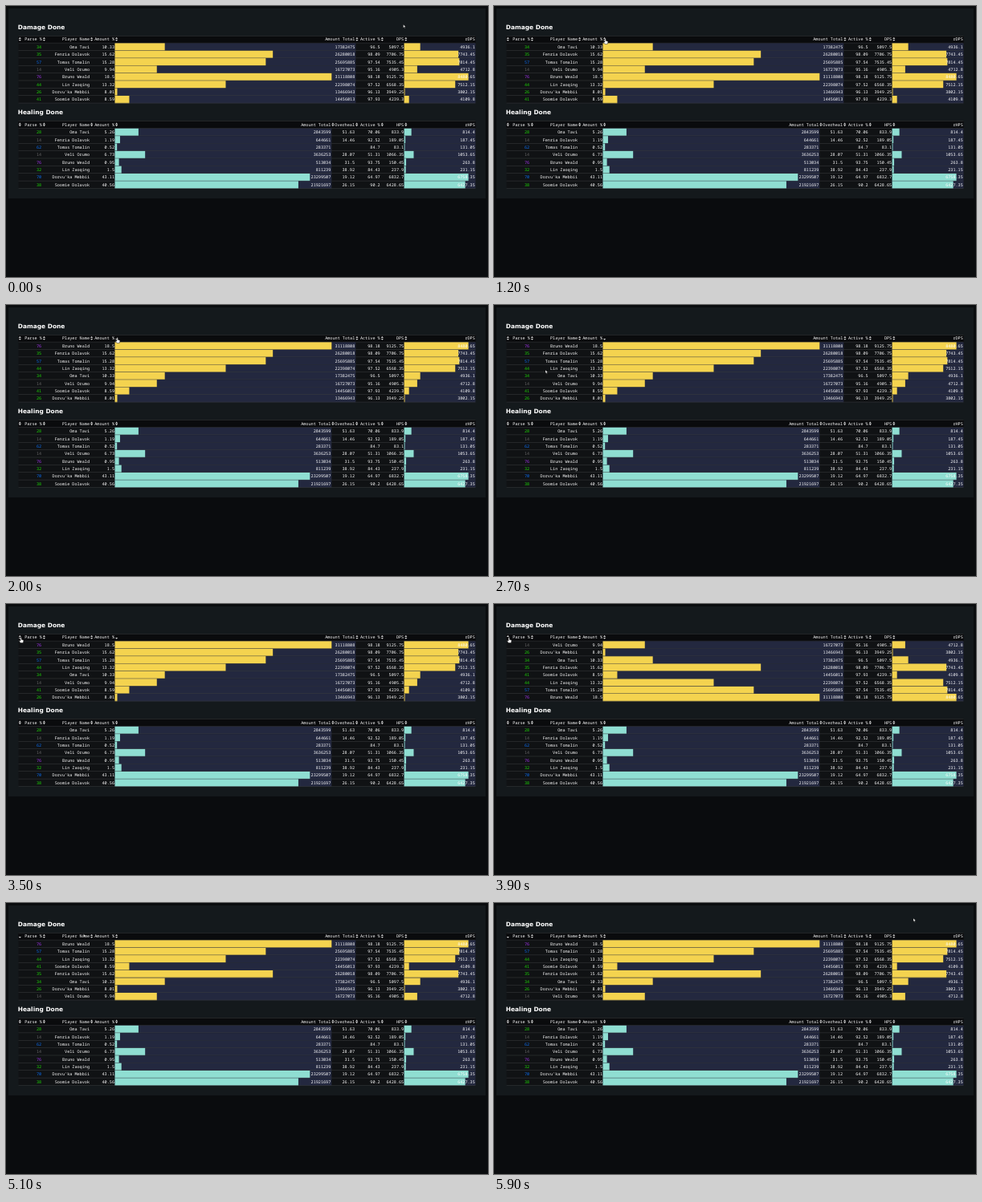
These frames come from a looping animation (600 px wide and 338 px high, 7 s). An HTML page:

```html
<!DOCTYPE html>
<html lang="en">
<head>
<meta charset="utf-8">
<title>Sortable tables</title>
<style>
html, body { margin: 0; width: 100%; height: 100%; overflow: hidden; background: #0a0c0e; }
svg { display: block; }
text { font: 5.17px "Noto Sans Mono", "DejaVu Sans Mono", monospace; fill: #fff; text-anchor: end; text-rendering: geometricPrecision; }
.title { font: bold 7.45px "DejaVu Sans", sans-serif; text-anchor: start; }
</style>
</head>
<body>
<svg id="stage" width="600" height="338" viewBox="0 0 600 338"></svg>
<script>
const LEFT = 15.5, RIGHT = 584.5, BAR = 135.5, RATE_BAR = 495.6, ROW = 9.37, LOOP = 7000, FIGHT = 3410;

// Name, then parse, rate and adjusted rate for damage and for healing
const players = [
  ["Oma Tavi", 34, 5097.5, 4936.1, 28, 833.9, 814.4],
  ["Fenria Dolavok", 35, 7706.75, 7743.45, 14, 189.05, 187.45],
  ["Tomas Tomalin", 57, 7535.45, 7814.45, 62, 83.1, 131.05],
  ["Veli Orumo", 14, 4905.3, 4712.8, 14, 1066.35, 1053.65],
  ["Bruno Weald", 76, 9125.75, 8480.65, 76, 150.45, 263.8],
  ["Lin Zaoqing", 44, 6568.35, 7512.15, 32, 237.9, 231.15],
  ["Dorvu'ka Mebbii", 26, 3949.25, 3802.15, 70, 6832.7, 6758.35],
  ["Soomie Dolavok", 41, 4239.3, 4109.8, 38, 6428.65, 6427.35]
];

const round2 = v => +v.toFixed(2);
const noise = n => { const v = Math.sin(n * 12.9898) * 43758.5453; return v - Math.floor(v); };
const between = (lo, hi, n) => round2(lo + (hi - lo) * noise(n));

function makeTable(title, unit, top, color, first, group, active) {
  const heals = unit === "HPS";
  const columns = [["Parse %", 44.8], ["Player Name", 104], ["Amount %", 135],
    ["Amount Total", heals ? 404.3 : 434.3], ...heals ? [["Overheal", 434]] : [],
    ["Active %", 465.7], [unit, 495.2], ["r" + unit, 583.8]];
  const rows = players.map((p, i) => {
    const [parse, rate, adjusted] = p.slice(first);
    const total = Math.round(rate * FIGHT);
    const overheal = rate > 100 ? between(12, 55, i + 1) : "";
    return { parse, rate, adjusted, cells: [parse, p[0], round2(rate / group), total,
      ...heals ? [overheal] : [], between(...active, i + 9), rate, adjusted] };
  });
  return { title, top, color, columns, rows, split: columns[3][1] + 1 };
}
const damage = makeTable("Damage Done", "DPS", 37, "#f4d34f", 1, 493.3, [94.5, 98.2]);
const healing = makeTable("Healing Done", "HPS", 143.4, "#8fded2", 4, 158.5, [42, 94]);

const rect = (x, y, w, h, fill) => `<rect x="${x}" y="${y}" width="${w}" height="${h}" fill="${fill}"/>`;
const label = (x, y, s, fill = "#fff") => `<text x="${x}" y="${y}" style="fill:${fill}">${s}</text>`;
const line = y => rect(LEFT, y, RIGHT - LEFT, 0.5, "#3a3c3f");
const parseColor = p => p < 25 ? "#6a6a6a" : p < 50 ? "#1ddb05" : p < 75 ? "#0a6cf0" : "#a335ee";

// A bar fills 1% of its cell for the lowest value and 90% for the highest.
function bar(table, row, key, x, right) {
  const all = table.rows.map(r => r[key]), min = Math.min(...all), max = Math.max(...all);
  const part = 0.01 + 0.89 * (row[key] - min) / (max - min);
  return rect(x, 0, right - x, ROW, "#23283f") + rect(x, 0, (right - x) * part, ROW, table.color);
}

function rowMarkup(table, row) {
  const texts = row.cells.map((s, c) =>
    label(table.columns[c][1] - (c ? 0 : 0.6), 6.5, s, c ? "#fff" : parseColor(s)));
  return `<g class="row">${bar(table, row, "rate", BAR, table.split)}
    ${bar(table, row, "adjusted", RATE_BAR, RIGHT)}${texts.join("")}${line(ROW - 0.5)}</g>`;
}

function headMarkup([name, edge], i, columns) {
  const iconX = (i ? columns[i - 1][1] : 14.7) + 2.6;
  return label(edge, 6.3, name) + `<g class="icon" transform="translate(${iconX} 4.4)" fill="#d8d8d8">
    <path d="M-1.6-.4L0-2.3 1.6-.4z"/><path d="M-1.6.5L0 2.4 1.6.5z"/></g>`;
}

const tableMarkup = t => `<g class="table" transform="translate(0 ${t.top})">
  <text class="title" x="14.8" y="-8.5">${t.title}</text>
  ${rect(LEFT, 0, RIGHT - LEFT, ROW * 9, "#101214")}${rect(LEFT, 0, RIGHT - LEFT, ROW, "#0a0b0d")}
  ${line(0)}${line(ROW - 0.5)}${t.columns.map(headMarkup).join("")}
  ${t.rows.map(r => rowMarkup(t, r)).join("")}</g>`;

const stage = document.getElementById("stage");
stage.innerHTML = rect(3, 3, 594, 237, "#14191c") + tableMarkup(damage) + tableMarkup(healing) +
  `<g id="cursor" stroke="#111" stroke-width=".4" fill="#fff">
    <path id="arrow" d="M0 0V4.2L1 3.3 1.7 4.8 2.4 4.5 1.7 3.1H3z"/>
    <path id="hand" transform="scale(1.15)" d="M-.6 0Q0-.7.6 0V2L2.5 2.5Q3 2.7 2.8 3.6L2.3 5.6H-.6L-2 3.5-1.5 3-.6 3.6z"/></g>`;

const [damageBox, healingBox] = stage.querySelectorAll(".table");
const damageRows = damageBox.querySelectorAll(".row");
const icons = damageBox.querySelectorAll(".icon");
const cursor = document.getElementById("cursor");
const [arrow, hand] = cursor.children;

const place = (rows, order) => order.forEach((r, i) =>
  rows[r].setAttribute("transform", `translate(0 ${ROW * (i + 1)})`));
const identity = players.map((_, i) => i);
place(healingBox.querySelectorAll(".row"), identity);

// Start time, sort key, direction, header icon
const sorts = [[0, "", 0, -1], [1500, "rate", 1, 3], [2000, "rate", -1, 3],
  [3800, "parse", 1, 0], [4200, "parse", -1, 0]];
// Time, x, y
const path = [[0, 494.5, 23], [800, 102, 59], [1200, 138.6, 41], [2000, 138.6, 41],
  [2300, 112, 115], [2700, 64, 81], [3500, 18.6, 42], [4900, 18.6, 42],
  [5700, 517.5, 20], [5900, 522, 19], [LOOP, 522, 19]];

function cursorAt(t) {
  const i = path.findIndex(p => p[0] > t);
  const [t0, x0, y0] = path[i - 1], [t1, x1, y1] = path[i];
  const u = (t - t0) / (t1 - t0), k = u * u * (3 - 2 * u);
  return [x0 + (x1 - x0) * k, y0 + (y1 - y0) * k];
}

function draw(now) {
  const t = Math.floor(now % LOOP / 100) * 100;
  const [, key, dir, active] = sorts.findLast(s => s[0] <= t);
  const value = i => key ? damage.rows[i][key] : i;
  place(damageRows, [...identity].sort((a, b) => dir * (value(a) - value(b))));
  icons.forEach((icon, i) => {
    const [up, down] = icon.children;
    up.style.opacity = i === active && dir < 0 ? 0 : 1;
    down.style.opacity = i === active && dir > 0 ? 0 : 1;
  });
  const pointing = t >= 1200 && t <= 2000 || t >= 3500 && t <= 4900;
  hand.style.display = pointing ? "" : "none";
  arrow.style.display = pointing ? "none" : "";
  cursor.setAttribute("transform", `translate(${cursorAt(t)})`);
}

const start = performance.now();
function tick() {
  draw(performance.now() - start);
  requestAnimationFrame(tick);
}
tick();
</script>
</body>
</html>
```
